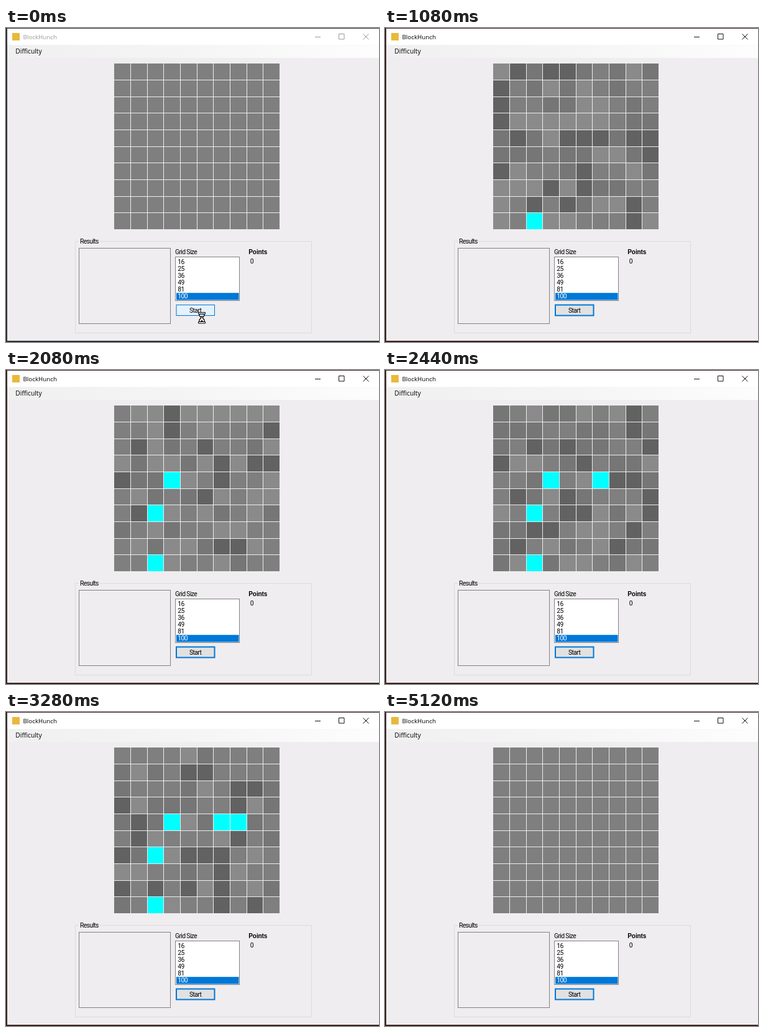
These frames come from a looping animation (600x504 px, 5.16 s). An HTML page:

```html
<!DOCTYPE html>
<html lang="en">
<head>
<meta charset="utf-8">
<title>BlockHunch</title>
<style>
  html, body { margin: 0; width: 100%; height: 100%; overflow: hidden; background: #efedef; }
  svg { display: block; width: 600px; height: 504px; }
  text { font: 10.3px Roboto, "Liberation Sans", sans-serif; letter-spacing: -.6px; fill: #000; }
  .ui { font: 10.3px "Open Sans", "Noto Sans", sans-serif; letter-spacing: 0; }
  .title { font-size: 9.8px; }
  .bold { font: bold 10px "Liberation Sans", Arial, sans-serif; letter-spacing: -.1px; }
  .line { fill: none; stroke: #828282; }
  #border { fill: none; stroke: #38221f; }
  #controls { fill: none; stroke: #111; }
  #button { fill: #e1e1e1; stroke: #0078d7; stroke-width: 2; }
  #cursor { display: none; }
  .idle #border { stroke: #303032; }
  .idle #controls { stroke: #999; }
  .idle .title { fill: #999; }
  .idle #button { fill: #e5f1fb; stroke-width: 1; }
  .idle #cursor { display: inline; }
</style>
</head>
<body>
<svg id="stage" class="idle" viewBox="0 0 600 504">
  <defs>
    <linearGradient id="menu">
      <stop offset="0" stop-color="#f0f0f0"/>
      <stop offset=".5" stop-color="#f5f5f5"/>
      <stop offset="1" stop-color="#fdfdfd"/>
    </linearGradient>
  </defs>
  <rect width="600" height="504" fill="#efedef"/>
  <rect width="600" height="27.5" fill="#fff"/>
  <rect y="27.5" width="600" height="20.5" fill="url(#menu)"/>
  <g id="border">
    <path d="M0 .5H600"/>
    <path d="M1 0V504M0 503H600" stroke-width="2"/>
  </g>
  <rect x="10" y="8" width="12" height="12" fill="#e8b93c"/>
  <text class="ui title" x="27.5" y="18">BlockHunch</text>
  <path id="controls" d="M497 14.5H506M535.5 9.5H544V18H535.5ZM574.5 9.5L583.5 18.5M583.5 9.5L574.5 18.5"/>
  <text class="ui" x="15.3" y="41.3">Difficulty</text>

  <g id="grid"></g>

  <path d="M117 342.5H111.5V489.5H491.5V342.5H150" fill="none" stroke="#dcdcdc"/>
  <text x="119" y="346">Results</text>
  <rect class="line" x="117.5" y="353.5" width="147" height="121"/>
  <text x="272" y="363">Grid Size</text>
  <rect class="line" x="272.5" y="367.5" width="103" height="70" style="fill:#fff"/>
  <rect x="274" y="425.2" width="100.5" height="11.3" fill="#0078d7"/>
  <g id="sizes"></g>
  <text class="bold" x="390.3" y="363">Points</text>
  <text x="392.7" y="377.7">0</text>
  <rect id="button" x="274" y="444.5" width="61.5" height="17"/>
  <text x="295" y="457">Start</text>
  <g id="cursor" fill="#fff" stroke="#000">
    <path d="M311 459V461.5L314 465L311 468.5V472H319V468.5L316 465L319 461.5V459Z" stroke-width="1.3"/>
    <path d="M309.5 456.5H320.5V459H309.5ZM309.5 471.5H320.5V474H309.5Z"/>
    <path d="M313 462H317L315 464ZM313 471L315 468.5L317 471Z" fill="#000" stroke="none"/>
  </g>
</svg>
<script>
const LOOP = 5160, TICK = 40, REVEAL = 560, FLICKER_END = 3920;
const SIDE = 10, PITCH = 26.65, LEFT = 174.3, TOP = 57.3;
// Column and row of each panel, in order of reveal.
const picks = [[2, 9], [3, 4], [2, 6], [6, 4], [7, 4], [0, 4]];
const order = picks.map(([col, row]) => row * SIDE + col);
const stage = document.getElementById('stage');

function add(parent, tag, attrs, text = '') {
  const node = document.createElementNS(stage.namespaceURI, tag);
  for (const key in attrs) node.setAttribute(key, attrs[key]);
  node.textContent = text;
  document.getElementById(parent).append(node);
  return node;
}

[16, 25, 36, 49, 81, 100].forEach((size, i) => add('sizes', 'text', {
  x: 276.3, y: 378.5 + i * 11.15, style: size === 100 ? 'fill:#fff' : ''
}, size));

// Panels sit on whole pixels with a one-pixel gap.
const edge = (origin, n) => Math.round(origin + n * PITCH);
const cells = Array.from({ length: SIDE * SIDE }, (_, i) => {
  const col = i % SIDE, row = Math.floor(i / SIDE);
  const x = edge(LEFT, col), y = edge(TOP, row);
  return add('grid', 'rect', {
    x, y,
    width: edge(LEFT, col + 1) - x - 1,
    height: edge(TOP, row + 1) - y - 1
  });
});

function randomFrom(seed) {
  return () => {
    seed = seed + 0x6d2b79f5 | 0;
    let t = Math.imul(seed ^ seed >>> 15, 1 | seed);
    t = t + Math.imul(t ^ t >>> 7, 61 | t) ^ t;
    return ((t ^ t >>> 14) >>> 0) / 2 ** 32;
  };
}

function shade(r) {
  const level = r < .2 ? 98 : r < .45 ? 118 : r < .75 ? 127 : 138;
  return `rgb(${level},${level},${level})`;
}

let lastTick = -1;
function draw(time) {
  const tick = Math.floor(time % LOOP / TICK);
  if (tick !== lastTick) {
    lastTick = tick;
    const now = tick * TICK;
    const playing = now >= TICK && now < FLICKER_END;
    const lit = playing ? order.slice(0, Math.floor(now / REVEAL)) : [];
    const random = randomFrom(tick * 7919);
    stage.classList.toggle('idle', tick === 0);
    cells.forEach((cell, i) => {
      const grey = playing ? shade(random()) : '#7f7f7f';
      cell.setAttribute('fill', lit.includes(i) ? '#0ff' : grey);
    });
  }
}

const start = performance.now();
function frame() {
  draw(performance.now() - start);
  requestAnimationFrame(frame);
}
frame();
</script>
</body>
</html>
```
